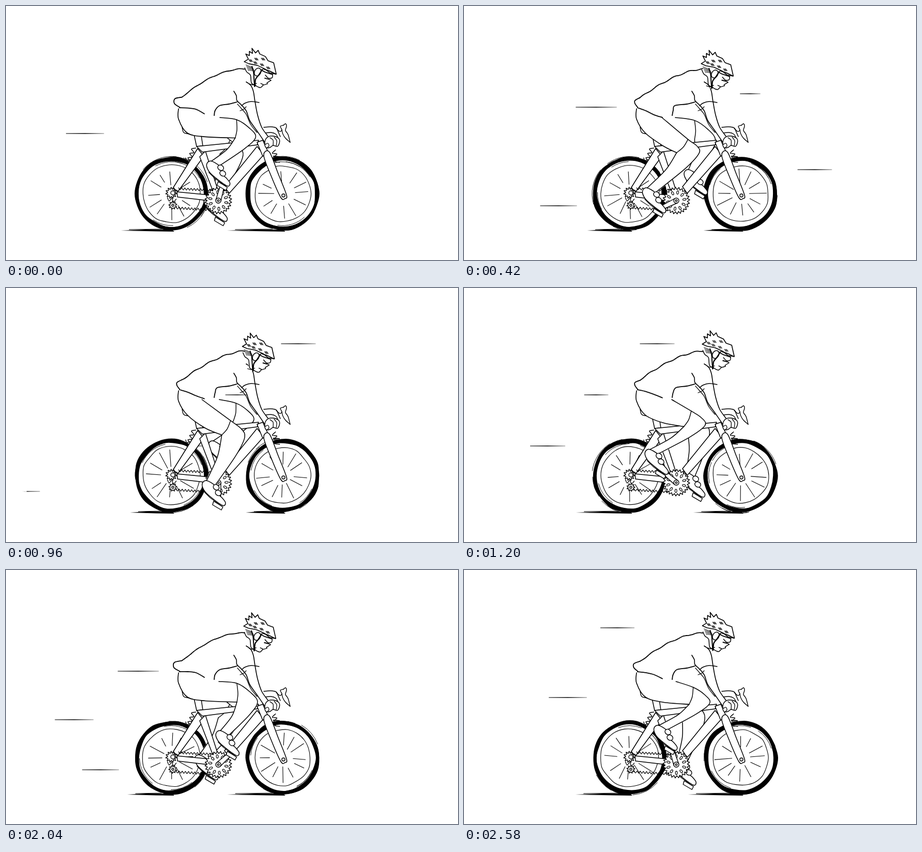
Recreate the animation shown at these times as an HTML page with a canvas. Size 875 by 492 pixels, loop 2.64 s.

```html
<!DOCTYPE html>
<html lang="en">
<head>
<meta charset="utf-8">
<title>Cyclist</title>
<style>
  html, body { margin: 0; width: 100%; height: 100%; overflow: hidden; background: #fff; }
  canvas { display: block; width: 875px; height: 492px; }
</style>
</head>
<body>
<canvas id="stage"></canvas>
<script>
const STEP = 60, FRAMES = 44, TURN = 11;
const canvas = document.getElementById('stage');
const ctx = canvas.getContext('2d');
const dpr = window.devicePixelRatio || 1;
canvas.width = 875 * dpr;
canvas.height = 492 * dpr;

const pts = s => s.trim().split(/\s+/).map(p => p.split(',').map(Number));
const shift = (list, x, y) => list.map(p => [p[0] + x, p[1] + y]);
const between = (a, b, k, dx = 0, dy = 0) => [a[0] + (b[0] - a[0]) * k + dx, a[1] + (b[1] - a[1]) * k + dy];
const polar = (x, y, r, a) => [x + r * Math.cos(a), y + r * Math.sin(a)];
const series = (n, f) => Array.from({ length: n }, (_, i) => f(i));
const rand = n => { const s = Math.sin(n * 127.1 + 11.7) * 43758.5453; return s - Math.floor(s); };
// cosine of the crank angle (degrees, 0 is up), peaking at `lead`
const swing = (deg, lead) => Math.cos((deg - lead) * Math.PI / 180);

function curve(p, closed) {
  const n = p.length, path = new Path2D();
  const at = i => closed ? p[(i + n) % n] : p[Math.max(0, Math.min(n - 1, i))];
  path.moveTo(...p[0]);
  for (let i = 0; i < (closed ? n : n - 1); i++) {
    const [a, b, c, d] = [at(i - 1), at(i), at(i + 1), at(i + 2)];
    path.bezierCurveTo(b[0] + (c[0] - a[0]) / 6, b[1] + (c[1] - a[1]) / 6,
      c[0] - (d[0] - b[0]) / 6, c[1] - (d[1] - b[1]) / 6, c[0], c[1]);
  }
  if (closed) path.closePath();
  return path;
}
function straight(p, closed) {
  const path = new Path2D();
  p.forEach(q => path.lineTo(...q));
  if (closed) path.closePath();
  return path;
}
function oval(x, y, rx, ry = rx, rot = 0) {
  const path = new Path2D();
  path.ellipse(x, y, rx, ry, rot, 0, Math.PI * 2);
  return path;
}
function ink(path, w = 1.4) { ctx.lineWidth = w; ctx.stroke(path); }
function blank(path) { ctx.fillStyle = '#fff'; ctx.fill(path); }
function shape(path, w) { blank(path); ink(path, w); }
function black(p) { ctx.fillStyle = '#000'; ctx.fill(straight(p, true)); }
const soft = (s, w) => ink(curve(pts(s)), w);
const hard = (s, w) => ink(straight(pts(s)), w);
const tube = s => shape(straight(pts(s), true), 1.5);

// a wavy line of n half waves
function wavy(a, b, n, amp, w) {
  const len = Math.hypot(b[0] - a[0], b[1] - a[1]);
  const nx = (a[1] - b[1]) / len * amp, ny = (b[0] - a[0]) / len * amp;
  ink(curve(series(n + 1, i => between(a, b, i / n, i % 2 ? nx : -nx, i % 2 ? ny : -ny))), w);
}

// lane height, middle of the streak, then the steps at which it is there
const STREAKS = [[108, 374, 20, 27], [112, 297, 43], [128, 320, 12], [170, 554, 7], [196, 256, 7, 34],
  [207, 256, 20], [247, 241, 27], [247, 201, 43], [248, 579, 12], [267, 204, 12], [290, 132, 34],
  [306, 162, 20], [317, 679, 7], [387, 183, 7, 27, 34], [394, 218, 12]];
function drawStreaks(frame) {
  STREAKS.forEach(([y, mid, ...steps], i) => steps.forEach(at => {
    const d = (frame - at + FRAMES * 1.5) % FRAMES - FRAMES / 2;
    if (d < -4 || d > (y - 100) / 70) return; // low streaks last longer
    const x = mid - d * 48, half = 18 + rand(i) * 22;
    const l = Math.max(40, x - half), r = x + half;
    if (r > l) black([[l, y - .4], [x, y - .8], [r, y - .2], [r, y + .2], [x, y + .7], [l, y + .4]]);
  }));
}

function wheel(x, y, rim, seed) {
  const ring = (r, wob, s) => series(18, i => polar(x, y, r + (rand(s + i) - .5) * wob, i * Math.PI / 9));
  blank(oval(x, y, 67));
  for (let k = 0; k < 3; k++) ink(curve(ring(66 + k * 1.4, 2.6, seed + k * 31), true), 5);
  for (let k = 0; k < 7; k++) {
    const a = rand(seed + k * 5) * 6.28, arc = new Path2D();
    arc.arc(x, y, k < 4 ? 70 + rand(seed + k + 9) * 3 : 62, a, a + .5 + rand(seed + k + 2) * .5);
    ink(arc, .9);
  }
  ink(curve(ring(rim, 2.4, seed + 70), true), 1.1);
  for (let k = 0; k < 12; k++) {
    const a = (k - 3) * Math.PI / 6 + (rand(seed + k * 3) - .5) * .2;
    ink(straight([polar(x, y, 16 + rand(seed + k) * 10, a), polar(x, y, 41 + rand(seed + k + 40) * 10, a)]), 1.1);
  }
}
function shadow(x, hub) {
  black([[x, 435], [hub - 50, 433], [hub, 433], [hub + 5, 437], [hub - 30, 436.5]]);
  hard(`${x + 16},433 ${hub - 20},432`, 1);
}
function cog(x, y, r, depth, teeth, turn) {
  shape(straight(series(teeth * 2, i => polar(x, y, i % 2 ? r : r - depth, turn + i * Math.PI / teeth)), true), 1.4);
}

const HUB = [411, 377];
const radians = deg => (deg - 90) * Math.PI / 180;
const pedalAt = deg => polar(...HUB, 37, radians(deg));
const heelAt = (deg, far) => {
  const [x, y] = pedalAt(deg);
  return [x - (far ? 18 : 32), y - (far ? 39 : 36)];
};

function crank(deg) {
  const a = radians(deg), end = pedalAt(deg);
  const side = (c, r) => polar(...c, r, a + Math.PI / 2);
  shape(straight([side(HUB, 5), side(end, 3.5), side(end, -3.5), side(HUB, -5)], true));
  shape(oval(...HUB, 5));
  ink(oval(...HUB, 1.8));
}
function foot(deg, far) {
  const [x, y] = heelAt(deg, far);
  const at = s => shift(pts(s), x, y);
  shape(straight(at('22,35 40,46 37,52 20,42'), true));
  shape(curve(at('8,-5 0,1 3,13 13,24 39,43 45,38 38,28 32,22 25,5'), true), 1.5);
  ink(straight(at('4,17 15,28 38,45')), 1.2);
  shape(oval(x + 27, y + 8, 6, 5, .6));
  shape(oval(x + 31, y + 19, 6, 5, .6));
}
function leg(deg, far) {
  const heel = heelAt(deg, far), front = [heel[0] + 25, heel[1] + 4], rear = [heel[0] + 8, heel[1] - 4];
  const thigh = [396 + 18 * swing(deg, 20), 216];
  const hem = [440 + 7 * swing(deg, 40), 240 - 21 * swing(deg, 35)];
  const knee = [471 + 16 * swing(deg, 55), 272 - 18 * swing(deg, 20)];
  const bend = [429 + 18 * swing(deg, 50), 271 - 16 * swing(deg, 30)];
  const top = [thigh, hem, between(hem, knee, .5, 6, -1), knee, between(knee, front, .35, 3, 3), front];
  const seat = [[334, 199], [334, 219], [351, 246], [386, 263 - 10 * swing(deg, 30)], bend];
  const calf = [bend, between(bend, rear, .45, 5, 2), rear];
  blank(curve([...top, ...calf.slice().reverse(), ...seat.slice().reverse()], true));
  ink(curve(top), 1.5);
  if (!far) ink(curve(seat), 1.6);
  ink(curve(calf), 1.5);
  ink(curve([hem, between(hem, bend, .5, 2, 2), bend]));
}

function bars() {
  soft('499,235 512,234 523,236 527,244 531,253', 1.5);
  soft('501,246 513,245 522,248 526,254');
  soft('523,237 530,243 534,240 531,233 537,231 541,228 543,233 541,241 546,249 550,264', 1.4);
  soft('534,240 536,248 541,256 550,264', 1.3);
}
function bike() {
  soft('341,235 344,245 354,248 366,251');
  tube('364,249 378,251 381,271 369,272');
  wavy([364, 274], [352, 304], 7, 3.5, 1.5);
  wavy([347, 296], [362, 304], 4, 2);
  tube('371,276 383,291 333,359 323,353');
  tube('331,360 393,366 392,377 332,370');
  tube('375,292 386,281 410,356 400,357');
  tube('486,272 499,288 432,363 423,350');
  tube('369,272 489,260 486,269 380,283');
  tube('486,264 497,260 508,284 497,291');
  wavy([518, 280], [526, 304], 6, 4);
  hard('518,291 529,292', 2.2);
  shape(curve(pts('499,290 510,283 527,325 543,366 540,373 532,371 514,331'), true), 1.5);
  ink(oval(537, 367, 3));
}
function drivetrain(deg) {
  const turn = radians(deg);
  wavy([334, 354], [404, 357], 23, 2, 1.3);
  wavy([329, 391], [396, 395], 22, 2, 1.3);
  cog(320, 362, 11, 4, 11, turn);
  shape(oval(323, 362, 4));
  wavy([312, 374], [329, 377], 4, 3);
  cog(323, 386, 8, 3, 9, turn);
  ink(oval(323, 386, 2));
  cog(...HUB, 26, 4.5, 24, turn);
  for (let i = 0; i < 10; i++) {
    const a = turn + .3 + i * Math.PI / 5;
    ink(oval(...polar(...HUB, 16, a), 3.4, 1.9, a), 1.2);
  }
}

function torso(deg) {
  const puff = Math.max(0, swing(deg, 50)), sag = swing(deg, 50);
  const back = series(24, i => {
    const k = i / 25;
    return [462 - 132 * k, 122 + 64 * k ** 1.6 + (1.2 - puff * .6) * Math.sin(k * 28 + deg) - puff * 5 * Math.sin(k * 3)];
  });
  const tail = [back[23], [331 - 5 * puff, 183 - 4 * puff], [331 - 6 * puff, 189], [336, 196]];
  const waist = [[336, 197], [352, 200 - 3 * sag], [368, 205 - 6 * sag], [384, 212 - 4 * sag]];
  const belly = [[403, 212], [405, 202], [411 + 3 * sag, 193], [431, 190], [447, 186]];
  blank(straight([...back, ...tail, ...waist, ...belly, [462, 195], [482, 185], [478, 155], [466, 130]], true));
  [back, tail, waist, belly].forEach(line => ink(curve(line), 1.8));
}
function arm() {
  const inner = pts('441,165 446,174 447,183 456,192 465,203 472,222 486,242 501,264');
  const outer = pts('465,147 474,154 479,166 482,185 487,211 495,235 507,252');
  soft('448,190 456,199 465,210 474,230 486,245', 1.3);
  blank(straight([...inner, ...outer.slice().reverse()], true));
  ink(curve(inner), 1.6);
  ink(curve(outer), 1.6);
  soft('456,193 463,188 475,185 490,187');
  soft('453,203 460,200 465,195', 1.2);
  shape(curve(pts('501,264 504,256 511,252 522,253 529,258 529,266 525,272 517,270 511,274 503,274'), true));
  soft('511,255 517,260 517,270', 1.3);
  soft('519,254 524,261 523,271', 1.3);
  soft('502,268 507,266 509,271 505,275', 1.3);
}
function head(deg) {
  ctx.save();
  ctx.translate(2 * swing(deg, -20) - .5, 3.5 - 2.7 * swing(deg, 0));
  blank(straight(pts('462,118 500,120 513,132 512,142 505,148 495,156 478,155 467,135'), true));
  soft('461,119 465,127 472,133 474,148 481,153', 1.5);
  hard('470,150 476,152 484,149', 1.2);
  for (let i = 0; i < 5; i++) hard(`${463 + i},${113 + i * 2.6} ${476 + i},${118 + i * 1.7}`, .9);
  shape(oval(486, 127, 6, 8, .5), 1.5);
  soft('475,116 478,127 479,140 480,155', 2);
  soft('495,122 488,133 482,141 481,154', 2.2);
  hard('493,123 500,127 515,132', 1.8);
  soft('515,132 514,138 507,139 501,133', 1.5);
  hard('500,139 508,141', 2);
  hard('508,141 512,143 504,148 505,150 498,152 492,149', 1.4);
  soft('497,152 492,157 487,156 482,153', 1.5);
  shape(straight(pts('460,107 468,102 463,92 470,95 470,87 476,91 475,81 482,90 487,85 490,92 501,97 506,105 517,109 522,131 510,129 500,121 485,114 469,111'), true), 1.6);
  hard('497,121 509,125 521,131', 1.8);
  for (const [x, y] of pts('473,105 484,102 497,102 482,109 495,113 507,119'))
    for (let i = -2; i <= 2; i += 2) hard(`${x + i - 2},${y - 2} ${x + i + 1},${y + 2}`, 1.1);
  ctx.restore();
}

function draw(frame) {
  const step = frame % TURN, deg = 15 + step * 360 / TURN, opposite = deg + 180, seed = step * 211 + 3;
  ctx.setTransform(dpr, 0, 0, dpr, 0, 0);
  ctx.fillStyle = '#fff';
  ctx.fillRect(0, 0, 875, 492);
  ctx.strokeStyle = '#000';
  ctx.lineCap = ctx.lineJoin = 'round';
  drawStreaks(frame);

  shadow(240 - 25 * Math.max(0, swing(deg, 330)), 321);
  shadow(447 - 20 * swing(deg, 30), 536);
  wheel(320.5, 363.5, 56, seed);
  wheel(535.5, 363.5, 54, seed + 500);

  leg(opposite, true);
  foot(opposite, true);
  bars();
  bike();
  drivetrain(deg);
  crank(deg);
  leg(deg);
  foot(deg);
  torso(deg);
  arm();
  head(deg);
}

function tick() {
  draw(Math.floor(performance.now() / STEP) % FRAMES);
  requestAnimationFrame(tick);
}
tick();
</script>
</body>
</html>
```
